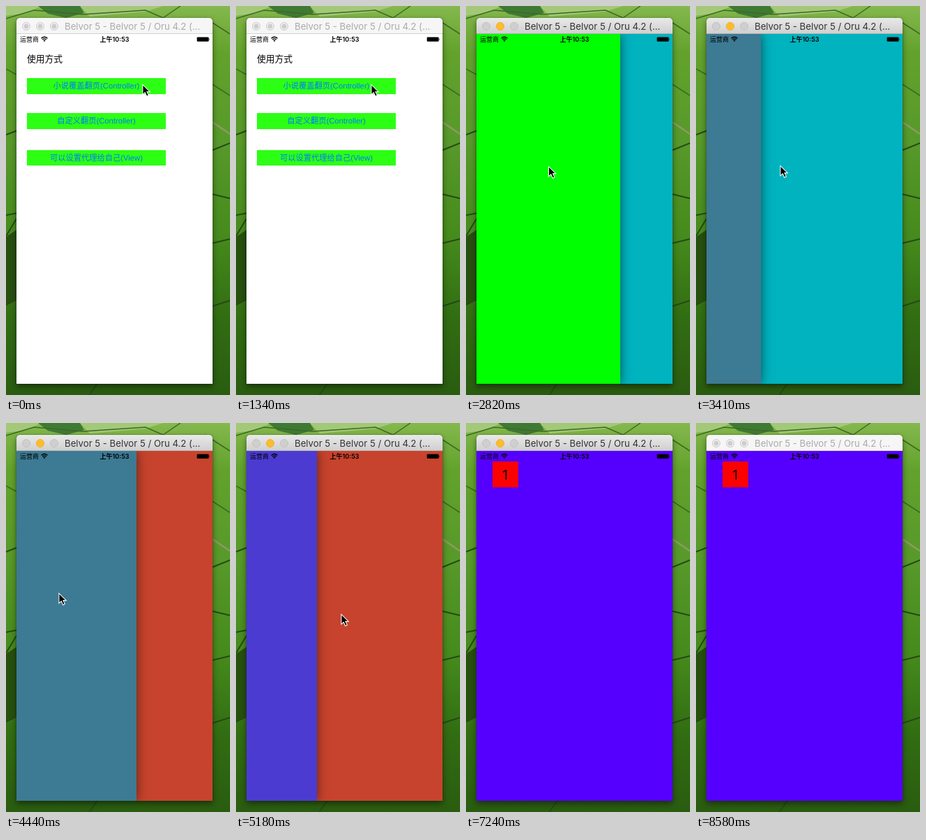
Animation, 321 px wide and 556 px high, one loop 8680 ms. Source, as an HTML page:

```html
<!DOCTYPE html>
<html lang="zh">
<head>
<meta charset="utf-8">
<title>翻页</title>
<style>
html, body { margin: 0; width: 100%; height: 100%; overflow: hidden; background: #3c8512; }
#stage { position: relative; width: 321px; height: 556px; overflow: hidden; }
#stage *, #field { position: absolute; box-sizing: border-box; }
#field { inset: 0; }
#window {
  left: 15px; top: 17px; width: 281px; height: 523px; border-radius: 5px 5px 0 0;
  box-shadow: 0 4px 9px rgba(0, 0, 0, .45), 0 0 2px rgba(0, 0, 0, .35);
}
#bar {
  left: 0; top: 0; width: 281px; height: 23px; border-radius: 5px 5px 0 0; overflow: hidden;
  background: #f6f6f6; border-bottom: 1px solid #d2d2d2;
  font: 13.2px/24px Inter, "Open Sans", sans-serif; color: #aaa; white-space: pre;
}
#bar span { left: 69px; top: 0; }
#bar i {
  top: 6px; width: 12px; height: 12px; border-radius: 50%;
  background: #cdcdcd; border: 1px solid #d0d0d0; box-shadow: inset 0 0 0 1.5px #f6f6f6;
}
#bar.active { background: linear-gradient(#e9e9e9, #d0d0d0); border-color: #b1b1b1; color: #333; }
#bar.active i { background: #cfcfcf; border-color: #c2c2c2; box-shadow: none; }
#bar.active i.mid { background: #fdbc2e; border-color: #f0b030; }
#bar.waking { background: linear-gradient(#fafafa 8px, #d6d6d6 8px, #cecece); }
#screen { left: 0; top: 23px; width: 281px; height: 500px; overflow: hidden; background: #fff; }
#home { inset: 0; font: 11.25px/22px "Liberation Sans", "Noto Sans CJK SC", "Noto Sans CJK", sans-serif; }
#home h1 { left: 15px; top: 25px; margin: 0; font-size: 12.75px; font-weight: 400; color: #000; white-space: nowrap; }
#home div { left: 15px; width: 199px; height: 22.5px; background: #2dff14; }
#home span { left: 0; width: 100%; text-align: center; color: #007aff; white-space: nowrap; }
.page { left: 0; top: 0; width: 281px; height: 500px; }
.page.lifted { box-shadow: 0 0 15px rgba(0, 0, 0, .55); }
.page b {
  left: 23px; top: 15px; width: 37px; height: 37px; background: #f00; color: #000;
  font: 400 19px/39px Inter, "Open Sans", sans-serif; text-align: center; text-indent: -1px;
}
#status { inset: 0; font: 9px/15px Inter, "Noto Sans CJK SC", "Noto Sans CJK", sans-serif; color: #000; }
#status span { top: 0; white-space: nowrap; }
#clock { left: 0; width: 281px; text-align: center; font-weight: 600; }
#status svg { left: 0; top: 0; }
#cursor { left: 0; top: 0; overflow: visible; }
</style>
</head>
<body>
<div id="stage">
  <svg id="field" width="321" height="556">
    <defs>
      <linearGradient id="grass" x2="0" y2="1">
        <stop offset="0" stop-color="#85b84e"/>
        <stop offset=".12" stop-color="#62a22c"/>
        <stop offset=".35" stop-color="#57992a"/>
        <stop offset=".6" stop-color="#458a1c"/>
        <stop offset=".8" stop-color="#316d12"/>
        <stop offset="1" stop-color="#2a5c10"/>
      </linearGradient>
    </defs>
    <path fill="url(#grass)" d="M0 0H321V556H0z"/>
    <path fill="#a3c978" d="M0 0H50L30 10 0 14zM106 0H225L200 8 120 15z"/>
    <path fill="#3f7a34" d="M46 0H106L112 10 86 17 60 11z"/>
    <path fill="#27500f" d="M0 330L15 320V418L0 428z"/>
    <g fill="none" stroke="#264a14" stroke-width="2">
      <path d="M0 184L16 178M0 299L16 296M0 329L15 304M0 427L20 417"/>
      <path d="M296 206L321 196M296 269L321 275M296 339L321 333M296 429L321 421M118 558L132 538"/>
    </g>
    <g fill="none" stroke="#3d6a20" stroke-width="1.5">
      <path d="M0 18L40 6 110 12 200 6 225 17 250 0M285 17L321 40M0 90L15 98M296 112L321 128"/>
    </g>
    <path fill="none" stroke="#8d9a62" stroke-width="2.5" d="M296 166L321 183"/>
  </svg>

  <div id="window">
    <div id="bar">
      <i style="left:8px"></i><i class="mid" style="left:28px"></i><i style="left:48px"></i>
      <span>Belvor 5 - Belvor 5 / Oru 4.2 (...</span>
    </div>
    <div id="screen">
      <div id="home">
        <h1>使用方式</h1>
        <div style="top:63px"><span id="tapped">小说覆盖翻页(Controller)</span></div>
        <div style="top:113px"><span>自定义翻页(Controller)</span></div>
        <div style="top:165.5px"><span>可以设置代理给自己(View)</span></div>
      </div>
      <div id="under" class="page"><b></b></div>
      <div id="top" class="page"><b></b></div>
      <div id="status">
        <span style="left:5px">运营商</span>
        <span id="clock">上午10:53</span>
        <svg width="281" height="15">
          <path fill="none" stroke="#000" stroke-width="1.4" d="M35.5 6.2Q40 2.4 44.5 6.2M37.2 8Q40 5.7 42.8 8"/>
          <path d="M38.4 9.2Q40 8 41.6 9.2L40 10.9z"/>
          <rect x="258.6" y="4.5" width="17" height="6.2" rx="1.3"/>
          <path d="M276 6.2q1.4 1.4 0 2.9z"/>
        </svg>
      </div>
    </div>
  </div>

  <svg id="cursor" width="14" height="20">
    <path transform="translate(.9 1.4) scale(.88)" stroke="#fff" stroke-width="1.2"
      d="M0 0V16.2L3.8 12.8 6.6 18.8 9.6 17.5 6.9 11.6H11.8z"/>
  </svg>
</div>

<script>
const LOOP = 8680, START = 1050, STEP = 147.4, LAST = 42, WIDTH = 281;
const $ = id => document.getElementById(id);

const green = ['#00ff00', 0], teal = ['#00b3bf', 1], slate = ['#3d7a94', 0],
      red = ['#c7432d', 1], indigo = ['#4b3bd1', 0], violet = ['#5500ff', 1];

// Each swipe moves the top page sideways over the page under it
const swipes = [
  { from: 11, xs: [0, -75, -200, -WIDTH], top: green, under: teal },
  { from: 15, xs: [-WIDTH, -203, -80, 0], top: slate, under: teal },
  { from: 22, xs: [0, -109, -230, -WIDTH], top: slate, under: red },
  { from: 27, xs: [-WIDTH, -180, -50, 0], top: indigo, under: red },
  { from: 32, xs: [0, -78, -220, -WIDTH], top: indigo, under: violet }
];

// Step, then value(s)
const rise = [[4, 500], [5, 380], [6, 99], [7, 20], [8, 0]];
const pointer = [
  [-1, 195, 111], [2, 193, 111], [8, 193, 111], [10, 190, 200], [11, 185, 230],
  [13, 50, 226], [15, 42, 226], [16, 120, 227], [17, 190, 232], [18, 205, 238],
  [22, 184, 243], [23, 75, 242], [24, 40, 246], [27, 45, 270], [28, 150, 272],
  [29, 200, 275], [32, 169, 278], [33, 90, 278], [34, 45, 282], [37, 60, 290],
  [41, 301, 300]
];

function at(track, k, col = 1) {
  const i = track.findIndex(p => p[0] >= k);
  if (i < 0) return track[track.length - 1][col];
  if (i === 0) return track[0][col];
  const a = track[i - 1], b = track[i];
  return a[col] + (b[col] - a[col]) * (k - a[0]) / (b[0] - a[0]);
}

function show(el, visible) {
  el.style.visibility = visible ? 'visible' : 'hidden';
}

function move(el, x, y) {
  el.style.transform = `translate(${x}px, ${y}px)`;
}

function paint(el, [color, number], x, y) {
  el.style.background = color;
  el.firstElementChild.textContent = number;
  move(el, x, y);
}

function draw(now) {
  const t = now % LOOP;
  const k = Math.max(-1, Math.min(LAST, Math.floor((t - START) / STEP + .06)));

  const active = k >= 4 && t < 8580;
  $('bar').className = active ? (k <= 6 ? 'active waking' : 'active') : '';
  $('tapped').style.opacity = k >= 4 && k <= 7 ? .6 : 1;

  const swipe = swipes.filter(s => s.from <= k).pop();
  const x = swipe ? swipe.xs[Math.min(k - swipe.from, 3)] : 0;
  paint($('under'), swipe ? swipe.under : teal, 0, 0);
  paint($('top'), swipe ? swipe.top : green, x, at(rise, k));
  show($('under'), swipe);
  show($('top'), k > 4 && x > -WIDTH);
  $('top').classList.toggle('lifted', !!swipe);

  move($('cursor'), at(pointer, k), at(pointer, k, 2));
  show($('cursor'), k < LAST);
  requestAnimationFrame(draw);
}
requestAnimationFrame(draw);
</script>
</body>
</html>
```
